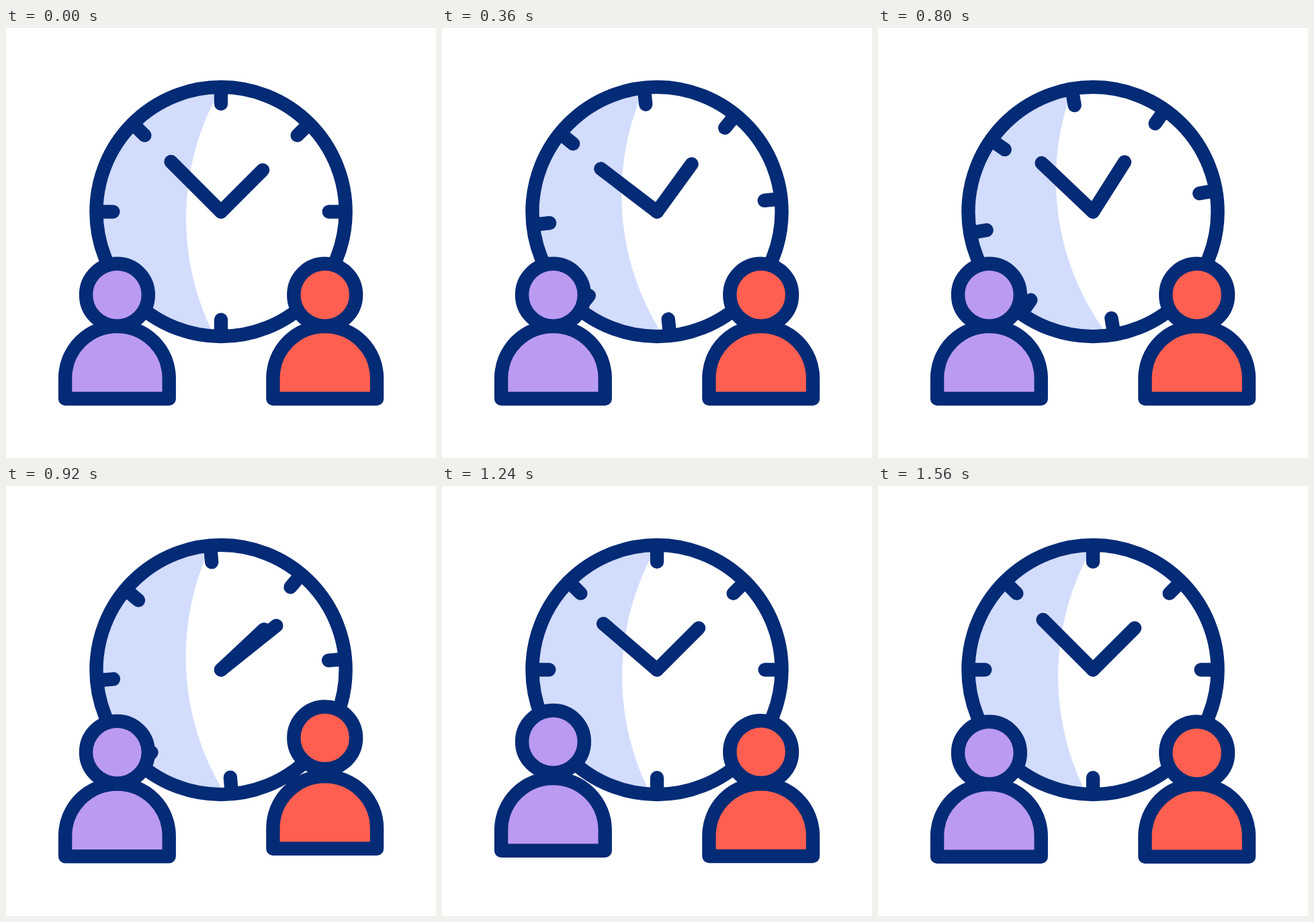
An HTML page that plays this animation: 640x640 px, repeating every 1800 ms.

```html
<!DOCTYPE html>
<html lang="en">
<head>
<meta charset="utf-8">
<title>Clock and two people</title>
<style>
  html, body { margin: 0; height: 100%; overflow: hidden; background: #fff; }
  svg { display: block; width: 100vw; height: 100vh; }
</style>
</head>
<body>
<svg viewBox="0 0 640 640" fill="none" stroke="#032b76" stroke-width="20.4" stroke-linecap="round" stroke-linejoin="round">
  <defs>
    <path id="tick" d="M0-180V-160.7"/>
    <path id="torso" d="M-77.3 551.8V521.3A77.3 77.3 0 0 1 77.3 521.3V551.8Z"/>
    <circle id="skull" cy="397.2" r="46.4"/>
  </defs>
  <g transform="translate(320 273.5)">
    <g id="face">
      <circle r="180" fill="#d2dcfd" stroke="none"/>
      <circle cx="334" cy="9.5" r="386" fill="#fff" stroke="none"/>
      <g id="ticks"></g>
    </g>
    <circle r="185.6"/>
    <path id="hour" d="M0 0V-87.7"/>
    <path id="minute" d="M0 0V-105.3"/>
  </g>
  <g transform="translate(165.4)" fill="#bb9af2">
    <use id="leftBody" href="#torso"/>
    <use id="leftHead" href="#skull"/>
  </g>
  <g transform="translate(474.7)" fill="#ff5f50">
    <use id="rightBody" href="#torso"/>
    <use id="rightHead" href="#skull"/>
  </g>
</svg>
<script>
  const LOOP = 1800, STEP = 40;
  const SMOOTH = [1 / 3, 2 / 3];
  const byId = id => document.getElementById(id);

  byId('ticks').innerHTML = Array.from({ length: 8 }, (_, i) =>
    `<use href="#tick" transform="rotate(${i * 45})"/>`).join('');

  // cubic-bezier(x1, 0, x2, 1), solved by bisection
  function ease(p, [x1, x2]) {
    let lo = 0, hi = 1;
    for (let i = 0; i < 24; i++) {
      const s = (lo + hi) / 2, r = 1 - s;
      if (3 * r * r * s * x1 + 3 * r * s * s * x2 + s * s * s < p) lo = s; else hi = s;
    }
    return lo * lo * (3 - 2 * lo);
  }

  // Each leg: [start, end, target value, easing]
  function track(t, value, legs) {
    for (const [start, end, target, curve = SMOOTH] of legs) {
      if (t <= start) break;
      if (t >= end) value = target;
      else return value + (target - value) * ease((t - start) / (end - start), curve);
    }
    return value;
  }

  const rotate = (id, angle) => byId(id).setAttribute('transform', `rotate(${angle})`);
  const lift = (id, y) => byId(id).setAttribute('transform', `translate(0 ${-y})`);

  function hop(side, t, start) {
    const height = track(t, 0, [[start, start + 200, 1], [start + 200, start + 475, 0]]);
    lift(side + 'Head', height * 34.4);
    lift(side + 'Body', height * 18.5);
  }

  function draw(now) {
    const t = Math.floor(now % LOOP / STEP) * STEP;
    rotate('face', track(t, 0, [[167, 667, -12, [.1, .6]], [685, 1105, 0]]));
    rotate('hour', track(t, 45, [[167, 667, 20, [.3, .65]], [667, 955, 48], [955, 1118, 45]]));
    rotate('minute', track(t, -45, [[167, 667, -70, [.38, .667]], [667, 1312, 315, [.56, .356]]]));
    hop('right', t, 800);
    hop('left', t, 900);
  }

  const begin = performance.now();
  function tick() {
    draw(performance.now() - begin);
    requestAnimationFrame(tick);
  }
  tick();
</script>
</body>
</html>
```
